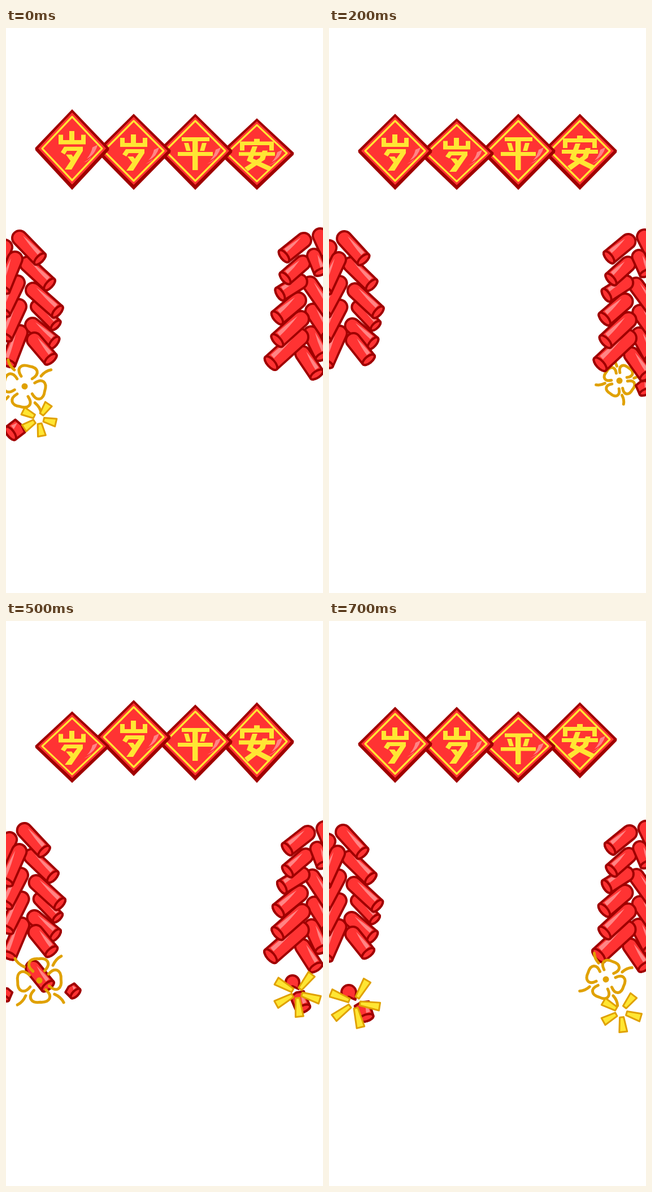
These frames come from a looping animation (561 by 998 pixels, 800 ms). An HTML page with a canvas:

```html
<!DOCTYPE html>
<html lang="zh">
<head>
<meta charset="utf-8">
<title>岁岁平安</title>
<style>
html, body { margin: 0; width: 100%; height: 100%; overflow: hidden; background: #fff; }
canvas { display: block; width: 561px; height: 998px; }
</style>
</head>
<body>
<canvas id="stage" role="img" aria-label="岁岁平安"></canvas>
<script>
const W = 561, H = 998, STEP = 100, STEPS = 8;
const RED = '#ff3333', DARK = '#a00000', PINK = '#ff8585', YELLOW = '#ffe633', GOLD = '#e0a100';
const canvas = document.getElementById('stage');
const ctx = canvas.getContext('2d');
const dpr = window.devicePixelRatio || 1;
canvas.width = W * dpr;
canvas.height = H * dpr;
ctx.lineJoin = 'round';

function at(x, y, angle, draw) {
  ctx.save();
  ctx.translate(x, y);
  ctx.rotate(angle);
  draw();
  ctx.restore();
}

function paint(path, fill, line, width) {
  if (fill) { ctx.fillStyle = fill; ctx.fill(path); }
  if (line) { ctx.strokeStyle = line; ctx.lineWidth = width; ctx.stroke(path); }
}

// Banner
const SUI = new Path2D('M-24 194h8v9h11v-15h9v15h12v-9h8v16h-48z M-14 214H19V221L-1 252H-13L9 221H-9L-13 227L-20 223z M-11 227H-1L5 235L-1 240z');
const PING = new Path2D('M-24 193H25V200H4.5V219H31V226H4.5V251H-5V226H-31V219H-5V200H-24z M-20 203h8l4 14h-8z M12 203h8l-4 14h-8z');
const AN = new Path2D('M-5 190H5V195H30V212H22V202H-22V212H-30V195H-5z M-32 215H32V222H-32z M-8 204H1L-7 227L26 243L22 251L-18 231z M10 212H19L14 229L-16 251L-22 244L5 226z');
const BASE = new Path2D('M0 151.5L65.5 216L65 220L0 286L-65 220L-65.5 216z');
const FACE = new Path2D('M0 157L60 217L0 277L-60 217z');
const FRAME = new Path2D('M0 164L53 217L0 270L-53 217z');
const SHINE = new Path2D('M45 211L36 215Q34 225 26 234Q41 227 45 211z M21 240Q29 236 34 231Q31 237 21 240z');

// Each pose is [lift, vertical stretch]
const POSES = { n: [0, 1], q: [0, .94], t: [0, 1.06], a: [-4, 1], b: [-8, 1], c: [-12, 1] };
const SIGNS = [
  [117, SUI, 'tqnbcqnn'],
  [226, SUI, 'ntqnbcqn'],
  [335, PING, 'nnntqabq'],
  [444, AN, 'qnnnntab']
];

function sign([x, glyph, moves], k) {
  const [lift, stretch] = POSES[moves[k]];
  ctx.save();
  ctx.translate(x, 286 + lift);
  ctx.scale(1, stretch);
  ctx.translate(0, -286);
  paint(BASE, DARK);
  paint(FACE, RED);
  paint(FRAME, null, YELLOW, 3.2);
  paint(SHINE, PINK);
  paint(glyph, YELLOW);
  ctx.restore();
}

// Firecracker from its cap centre to the middle of its open end
function tube(x1, y1, x2, y2, h = 13, flat = false) {
  const len = Math.hypot(x1 - x2, y1 - y2);
  const s = x1 < x2 ? 1 : -1;
  at(x2, y2, Math.atan2(y1 - y2, x1 - x2), () => {
    const body = new Path2D();
    body.moveTo(0, -h);
    body.lineTo(len, -h);
    if (flat) body.lineTo(len + 3, 0), body.lineTo(len, h);
    else body.arc(len, 0, h, -Math.PI / 2, Math.PI / 2);
    body.lineTo(0, h);
    body.ellipse(0, 0, h * .45, h, 0, Math.PI / 2, Math.PI * 1.5);
    body.closePath();
    paint(body, RED, DARK, 4);
    const shine = new Path2D();
    shine.moveTo(len * .98, s * h * .55);
    shine.quadraticCurveTo(len * .5, s * h * .72, h * .65, s * h * .74);
    shine.lineTo(h * .65, s * h * .2);
    shine.quadraticCurveTo(len * .6, s * h * .25, len * .98, s * h * .55);
    paint(shine, PINK);
    const end = new Path2D();
    end.ellipse(0, 0, h * .45, h, 0, 0, Math.PI * 2);
    paint(end, RED, DARK, 4);
  });
}

const chip = (x1, y1, x2, y2, h) => tube(x1, y1, x2, y2, h, true);

function dome(x, y, deg, h = 12) {
  at(x, y, deg * Math.PI / 180, () => {
    const p = new Path2D();
    p.arc(0, 0, h, -Math.PI / 2, Math.PI / 2);
    p.lineTo(-h, h * .9);
    p.lineTo(-h * .6, 0);
    p.lineTo(-h * .9, -h * .8);
    p.closePath();
    paint(p, RED, DARK, 4);
  });
}

function flower(x, y, r, deg) {
  ctx.lineCap = 'round';
  at(x, y, deg * Math.PI / 180, () => {
    const p = new Path2D();
    p.arc(0, 0, 5.5, 0, Math.PI * 2);
    paint(p, GOLD);
    const petal = new Path2D();
    petal.moveTo(r * .42, -r * .26);
    petal.bezierCurveTo(r * .72, -r * .58, r, -r * .42, r * .96, 0);
    petal.bezierCurveTo(r, r * .42, r * .72, r * .58, r * .42, r * .26);
    for (let i = 0; i < 4; i++) {
      paint(petal, null, GOLD, 5);
      ctx.rotate(Math.PI / 4);
      const ray = new Path2D();
      ray.moveTo(r * .9, 0);
      ray.quadraticCurveTo(r * 1.2, -r * .1, r * 1.45, 0);
      paint(ray, null, GOLD, 5);
      ctx.rotate(Math.PI / 4);
    }
  });
  ctx.lineCap = 'butt';
}

function sparks(x, y, inner, outer, turn = 0) {
  for (const deg of [210, -52, 17, 84, 151]) {
    at(x, y, (deg + turn) * Math.PI / 180, () => {
      paint(new Path2D(`M${inner} -3.5L${outer} -7V7L${inner} 3.5z`), YELLOW, GOLD, 3);
    });
  }
}

// Strings of firecrackers, listed back to front
const LEFT = [
  [38, 417, 77, 453], [24, 371, 60, 408], [55, 492, 88, 525, 11],
  [47, 525, 85, 556], [48, 463, 91, 501], [50, 551, 79, 585],
  [25, 538, 4, 592], [23, 492, -2, 546], [20, 450, -5, 502],
  [-2, 387, -20, 430], [16, 408, -6, 462]
];
const RIGHT = [
  [525, 575, 550, 612], [540, 540, 560, 580], [543, 500, 570, 540],
  [538, 452, 575, 505], [520, 546, 469, 592, 15], [522, 514, 480, 552, 14],
  [517, 481, 480, 512, 14], [520, 448, 485, 470], [525, 415, 494, 442],
  [527, 375, 492, 403], [556, 367, 572, 402], [545, 402, 557, 431, 12]
];
// Swing per step: [shift at the top, extra shift lower down, drop]
const SWING_L = [[0, 0, 0], [1, -5, 0], [2, -10, 1], [2, -10, 1], [2, -10, 1], [8, -6, -1], [0, -1, 0], [0, -9, 2]];
const SWING_R = [[0, 0, 0], [2, 4, 1], [3, 7, 2], [4, 6, 3], [4, 6, 3], [6, -6, 0], [0, 0, 2], [5, 3, -1]];

function string(list, [top, low, drop]) {
  const dx = y => top + low * (y - 390) / 180;
  for (const [x1, y1, x2, y2, h] of list) {
    tube(x1 + dx(y1), y1 + drop, x2 + dx(y2), y2 + drop, h);
  }
}

// Loose pieces and bursts behind and in front of the strings
const BACK = {
  1() { chip(551, 620, 558, 640, 11); },
  2() { flower(514, 623, 29, 35); chip(553, 627, 560, 643, 11); },
  3() { tube(32, 562, 56, 598); tube(505, 602, 520, 640); },
  4() {
    flower(38, 624, 39, -8);
    chip(72, 588, 79, 598, 9);
    tube(34, 572, 62, 610);
    chip(553, 627, 560, 643, 11);
  }
};
const FRONT = {
  0() {
    flower(33, 633, 38, 13);
    chip(25, 703, 8, 716, 14);
    sparks(58, 690, 9, 31, -4);
  },
  1() { sparks(514, 630, 12, 36); },
  3() { sparks(38, 624, 12, 38); },
  4() {
    chip(10, 607, 1, 618, 10);
    tube(507, 621, 525, 660);
  },
  5() {
    tube(48, 613, 74, 645);
    flower(59, 635, 40, -3);
    chip(113, 648, 123, 658, 11);
    chip(2, 652, -4, 666, 10);
    dome(507, 638, -90);
    chip(515, 659, 526, 685, 13);
    sparks(515, 657, 9, 42);
  },
  6() {
    tube(41, 631, 64, 670);
    dome(448, 680, 195, 13);
    chip(552, 683, 546, 706, 13);
    sparks(505, 686, 15, 43);
  },
  7() {
    dome(35, 656, -90, 13);
    chip(58, 676, 66, 701, 13);
    sparks(45, 674, 10, 45, -8);
    flower(490, 633, 35, 21);
    sparks(517, 690, 10, 36);
  }
};

function draw(k) {
  ctx.setTransform(dpr, 0, 0, dpr, 0, 0);
  ctx.fillStyle = '#fff';
  ctx.fillRect(0, 0, W, H);
  for (let i = SIGNS.length; i--;) sign(SIGNS[i], k);
  if (BACK[k]) BACK[k]();
  string(LEFT, SWING_L[k]);
  string(RIGHT, SWING_R[k]);
  if (FRONT[k]) FRONT[k]();
}

const start = performance.now();
function tick() {
  draw(Math.floor((performance.now() - start) / STEP) % STEPS);
  requestAnimationFrame(tick);
}
tick();
</script>
</body>
</html>
```
